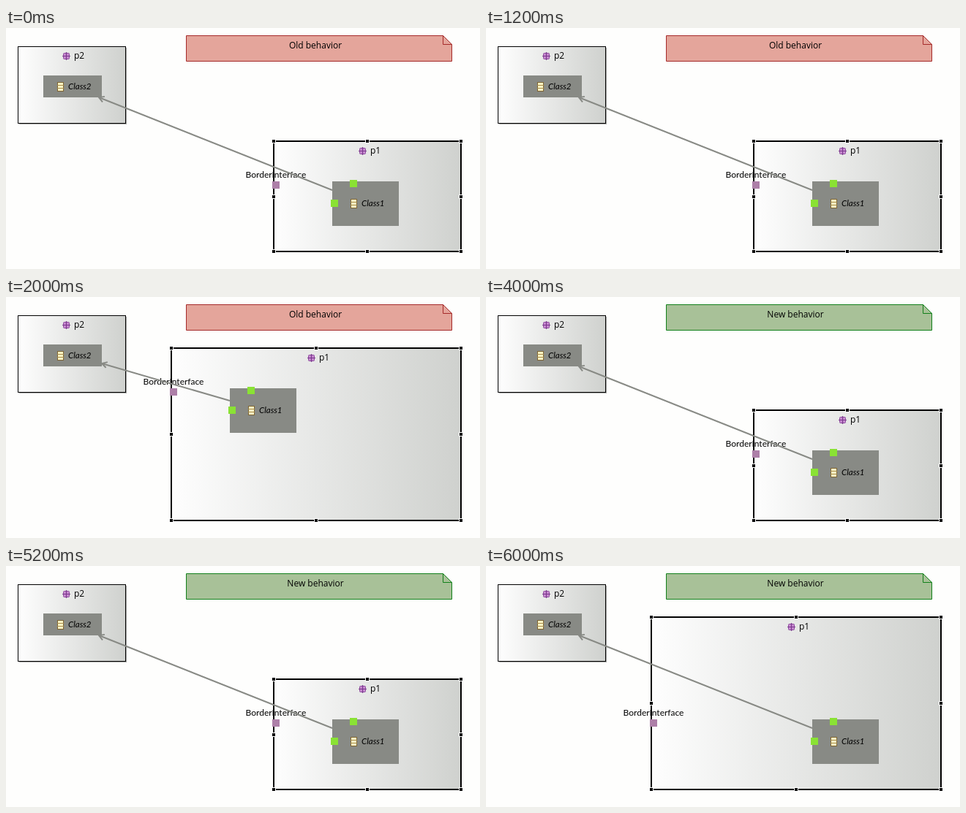
These frames come from a looping animation (648x330 px, 8000 ms). An HTML page:

```html
<!DOCTYPE html>
<html lang="en">
<head>
<meta charset="utf-8">
<title>Container resize behavior</title>
<style>
  html, body { margin: 0; width: 100%; height: 100%; overflow: hidden; background: #fefefd; }
  svg { display: block; width: 648px; height: 330px; }
  text { font: 12px "Open Sans", "Noto Sans", sans-serif; fill: #000; }
  .name { font: italic 11.5px Lato, "Open Sans", sans-serif; }
  .port { font: 12px Lato, "Open Sans", sans-serif; }
  .crisp { shape-rendering: crispEdges; }
</style>
</head>
<body>
<svg viewBox="0 0 648 330">
  <defs>
    <linearGradient id="shade">
      <stop offset="0" stop-color="#fefefe"/>
      <stop offset="1" stop-color="#cfd1ce"/>
    </linearGradient>
    <g id="package">
      <rect x="-4" y="-4" width="8" height="8" rx="1" fill="#c88ad0" stroke="#8b4a9c"/>
      <path d="M0-5.5V5.5M-5.5 0H5.5" stroke="#7b3a8e" stroke-width="1.2"/>
    </g>
    <g id="class" class="crisp">
      <rect x=".5" y=".5" width="8" height="12" fill="#fff6c4" stroke="#7d6434"/>
      <path d="M0 4.5H9M0 8.5H9" stroke="#a58a4c"/>
    </g>
  </defs>

  <g id="note">
    <path d="M246.5 10.5H597.5L609.5 22.5V45.5H246.5Z"/>
    <path d="M597.5 10.5V22.5H609.5" fill="none"/>
  </g>
  <text id="title" x="423" y="28" text-anchor="middle"></text>

  <g class="crisp">
    <path d="M18 131.5H164.5V27" fill="none" stroke="#a9aaa8"/>
    <rect x="16.5" y="25.5" width="147" height="105" fill="url(#shade)" stroke="#000"/>
    <rect x="51" y="65" width="80" height="30" fill="#888a85"/>
  </g>
  <use href="#package" x="82.5" y="38.5"/>
  <text x="93" y="42">p2</text>
  <use href="#class" x="70" y="74"/>
  <text class="name" x="85" y="84">Class2</text>

  <rect id="box" class="crisp" fill="url(#shade)" stroke="#000" stroke-width="2"/>
  <g id="heading">
    <use href="#package"/>
    <text x="10.5" y="3.5">p1</text>
  </g>
  <g id="inner">
    <rect class="crisp" width="91" height="61" fill="#888a85"/>
    <use href="#class" x="25" y="24"/>
    <text class="name" x="40" y="34">Class1</text>
    <path class="crisp" d="M24-2h10v10h-10zM-2 25h10v10h-10z" fill="#8ae234"/>
  </g>
  <g id="port">
    <rect class="crisp" x="-5" y="-5" width="10" height="10" fill="#ad7fa8"/>
    <text class="port" y="-10" text-anchor="middle">BorderInterface</text>
  </g>
  <g fill="none" stroke="#888a85" stroke-width="2">
    <path id="line"/>
    <path id="head" d="M-7-4L0 0L-7 4"/>
  </g>
  <g id="handles" class="crisp"></g>
</svg>
<script>
  const $ = id => document.getElementById(id);
  const set = (id, attrs) => {
    for (const key in attrs) $(id).setAttribute(key, attrs[key]);
  };
  const move = (id, x, y) => set(id, { transform: `translate(${x} ${y})` });

  const STEP = 2000, RIGHT = 622, BOTTOM = 306;
  const small = { x: 366, y: 155, inner: [446, 210], portY: 215, from: [446, 222], to: [127, 95] };
  const large = { x: 226, y: 70 };
  const poses = [
    small,
    { ...large, inner: [306, 125], portY: 130, from: [306, 142], to: [131, 91] },
    small,
    { ...small, ...large }
  ];
  const notes = [
    { label: "Old behavior", fill: "#e4a59b", stroke: "#a52a2a" },
    { label: "New behavior", fill: "#a8c198", stroke: "#11801a" }
  ];

  function handle(x, y) {
    const left = Math.round(x) - 3, top = Math.round(y) - 3;
    return `<rect x="${left}" y="${top}" width="6" height="6" fill="#fff"/>` +
      `<rect x="${left + 1}" y="${top + 1}" width="4" height="4"/>`;
  }

  function drawHandles(x, y) {
    const xs = [x, (x + RIGHT) / 2, RIGHT];
    const ys = [y, (y + BOTTOM) / 2, BOTTOM];
    let out = "";
    xs.forEach((hx, i) => ys.forEach((hy, j) => {
      if (i !== 1 || j !== 1) out += handle(hx, hy);
    }));
    $("handles").innerHTML = out;
  }

  function drawArrow([x1, y1], [x2, y2]) {
    const angle = Math.atan2(y2 - y1, x2 - x1) * 180 / Math.PI;
    set("line", { d: `M${x1} ${y1}L${x2} ${y2}` });
    set("head", { transform: `translate(${x2} ${y2}) rotate(${angle})` });
  }

  function draw(step) {
    const { x, y, inner, portY, from, to } = poses[step];
    const { label, fill, stroke } = notes[step >> 1];
    set("note", { fill, stroke });
    $("title").textContent = label;
    set("box", { x, y, width: RIGHT - x, height: BOTTOM - y });
    move("heading", (x + RIGHT) / 2 - 6.5, y + 13.5);
    move("inner", ...inner);
    move("port", x + 3, portY);
    drawArrow(from, to);
    drawHandles(x, y);
  }

  const start = performance.now();
  let shown = -1;
  function tick() {
    const step = Math.floor((performance.now() - start) / STEP) % poses.length;
    if (step !== shown) draw(shown = step);
    requestAnimationFrame(tick);
  }
  tick();
</script>
</body>
</html>
```
